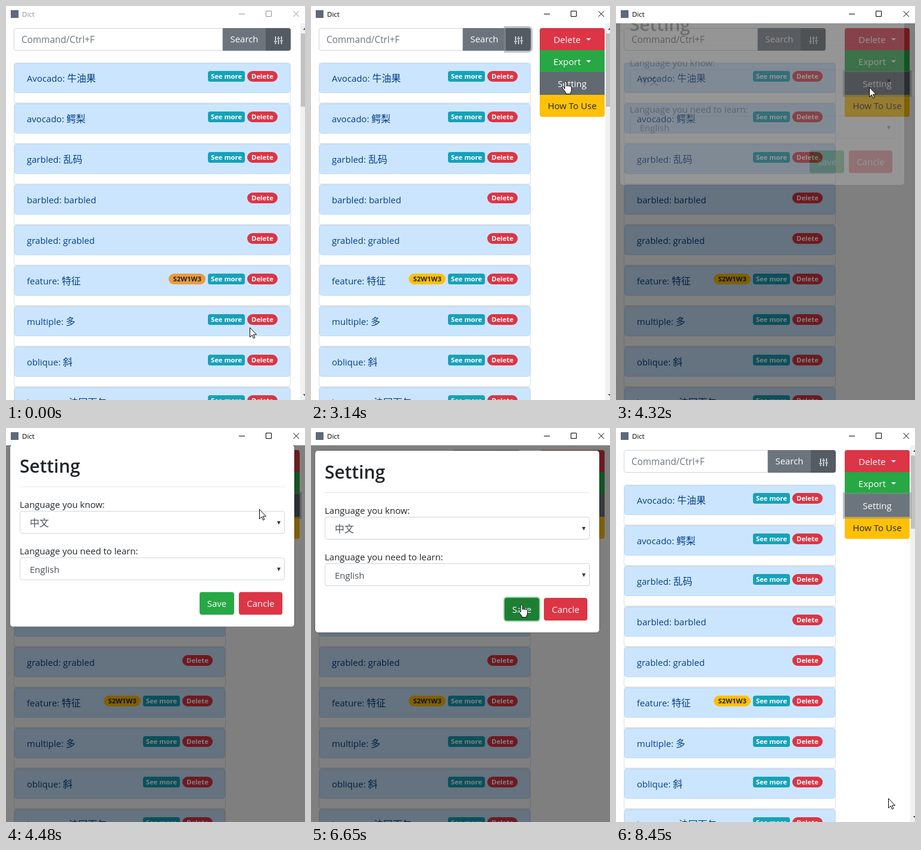
Animation of 502x661 px, one loop 8600 ms. Source, as an HTML page:

```html
<!DOCTYPE html>
<html lang="en">
<head>
<meta charset="utf-8">
<title>Dict</title>
<style>
  * { box-sizing: border-box; }
  html, body { margin: 0; width: 100%; height: 100%; overflow: hidden; background: #fff; }
  body { font: 15px "Open Sans", "Noto Sans", sans-serif; color: #212529; }
  #stage { position: relative; width: 502px; height: 661px; overflow: hidden; background: #fff; }
  #stage > *, .modal > * { position: absolute; }
  svg { display: block; overflow: visible; }

  /* title bar */
  .bar { left: 0; top: 0; width: 502px; height: 29px; background: #fff; z-index: 5; animation: wake 8.6s step-end infinite; }
  .bar > * { position: absolute; }
  .bar i { left: 8px; top: 7px; width: 13px; height: 13px; background: #5b6a7c; }
  .bar span { left: 27px; font-size: 11.5px; line-height: 28px; }
  .bar svg { left: 0; top: 0; fill: none; stroke: currentColor; }
  @keyframes wake { 0% { color: #96908f; } 26.628%, 100% { color: #000; } }

  /* search row */
  .search { left: 13px; top: 37px; height: 38px; display: flex; line-height: 37px; color: #fff; animation: search 8.6s step-end infinite; }
  .field { flex: 1; padding-left: 12px; border: 1px solid #ced4da; border-radius: 4px 0 0 4px; font-size: 15.4px; color: #6c757d; }
  .go { width: 72px; background: #6c757d; text-align: center; }
  .tune { width: 42px; padding: 14px 0 0 14px; background: #545b62; border-radius: 0 4px 4px 0; animation: tune 8.6s infinite; }
  @keyframes search {
    0% { width: 465px; } 28.488% { width: 356px; }
    47.791% { width: 339px; } 82.209%, 100% { width: 356px; }
  }
  @keyframes tune {
    0%, 26.628%, 47.442%, 100% { box-shadow: 0 0 0 0 rgba(130,138,145,.5); }
    28.372%, 45.698% { box-shadow: 0 0 0 3.2px rgba(130,138,145,.5); }
  }

  /* word list */
  .list { left: 13px; top: 95px; animation: list 8.6s step-end infinite; }
  @keyframes list { 0% { width: 465px; } 28.488%, 100% { width: 356px; } }
  .card { position: relative; height: 68px; border: 1px solid rgba(0,0,0,.125); border-radius: 4px; background: #fff; }
  .word { height: 50px; padding-left: 20px; border: 1px solid #b8daff; border-radius: 4px; background: #cce5ff; color: #004085; line-height: 48px; white-space: nowrap; }
  .zh { font: 16px/0 "Noto Sans CJK SC", "Noto Sans CJK", sans-serif; }
  .tags { position: absolute; right: 21px; top: 13px; display: flex; gap: 4px; font: 700 11.3px/18px "Open Sans", sans-serif; color: #fff; }
  .tags b { height: 18px; padding: 0 7.2px; border-radius: 9px; }
  .tags .more { padding: 0 4.8px; border-radius: 4px; background: #17a2b8; }
  .del { background: #dc3545; }
  .code { color: #212529; animation: code 8.6s step-end infinite; }
  @keyframes code { 0% { background: #ee9a3c; } 26.628%, 100% { background: #ffc107; } }

  /* side menu */
  .menu { left: 384px; top: 37px; width: 109px; color: #fff; text-align: center; animation: menu 8.6s step-end infinite; }
  .menu div { position: relative; height: 38px; margin-bottom: -1px; line-height: 38px; }
  .menu div:first-child { background: #dc3545; border-radius: 4px 4px 0 0; animation: red 8.6s infinite; }
  .menu div:nth-child(2) { background: #28a745; animation: green 8.6s infinite; }
  .menu div:nth-child(3) { z-index: 1; animation: setting 8.6s infinite; }
  .menu div:last-child { background: #ffc107; color: #212529; border-radius: 0 0 4px 4px; }
  .caret::after { content: ""; display: inline-block; margin-left: 9px; vertical-align: 4px; border: 4.8px solid transparent; border-top-color: #fff; border-bottom: 0; }
  @keyframes menu { 0% { visibility: hidden; } 28.488%, 100% { visibility: visible; } }
  @keyframes red { 0%, 28.488%, 36.5%, 100% { background: #dc3545; } 30.233%, 35% { background: #c82333; } }
  @keyframes green { 0%, 35.3%, 36.5%, 100% { background: #28a745; } 35.9% { background: #218838; } }
  @keyframes setting {
    0%, 35.93% { background: #6c757d; box-shadow: 0 0 0 0 rgba(130,138,145,.5); }
    36.512% { background: #626a71; }
    37.7%, 45.698% { background: #5a6268; box-shadow: 0 0 0 0 rgba(130,138,145,.5); }
    47.442%, 77.32% { background: #545b62; box-shadow: 0 0 0 3.2px rgba(130,138,145,.5); }
    77.326%, 82.209% { background: #6c757d; box-shadow: 0 0 0 0 rgba(130,138,145,.5); }
    83.605%, 100% { background: #6c757d; box-shadow: 0 0 0 3.2px rgba(130,138,145,.5); }
  }

  .scroll { left: 494px; top: 29px; width: 17px; height: 632px; background: #f1f1f1; animation: scroll 8.6s step-end infinite; }
  .scroll::before { content: ""; position: absolute; left: 1px; top: 17px; width: 15px; height: 123px; background: #c1c1c1; }
  @keyframes scroll { 0% { visibility: visible; } 47.791% { visibility: hidden; } 82.209%, 100% { visibility: visible; } }

  /* dialog */
  .shade { inset: 29px 0 0; background: #000; z-index: 2; animation: shade 8.6s linear infinite; }
  @keyframes shade { 0%, 47.791%, 82.151%, 100% { opacity: 0; } 49.535%, 80.407% { opacity: .5; } }
  .modal { left: 7px; top: 38px; width: 477px; height: 305px; background: #fff; border-radius: 4.8px; box-shadow: 0 0 0 1px rgba(0,0,0,.2); z-index: 3; animation: fade 8.6s linear infinite, slide 8.6s ease-out infinite; }
  .modal h2 { left: 16px; top: 16px; margin: 0; font-size: 30px; font-weight: 600; line-height: 40px; }
  .modal hr { left: 16px; top: 70px; width: 445px; margin: 0; border: 0; border-top: 1px solid rgba(0,0,0,.1); }
  .modal label { left: 16px; line-height: 24px; }
  .pick { left: 16px; width: 445px; height: 38px; padding-left: 16px; border: 1px solid #ced4da; border-radius: 4px; line-height: 38px; color: #495057; }
  .pick::after { content: ""; position: absolute; right: 6px; top: 16px; border: 3px solid transparent; border-top: 6px solid #343a40; border-bottom: 0; }
  .btn { top: 247px; height: 38px; border-radius: 4px; line-height: 38px; color: #fff; text-align: center; }
  .save { left: 318px; width: 58px; animation: save 8.6s infinite; }
  .cancel { left: 384px; width: 73px; background: #dc3545; }
  @keyframes fade { 0%, 49.93%, 80.349%, 100% { opacity: 0; } 51.674%, 78.605% { opacity: 1; } }
  @keyframes slide {
    0%, 49.93% { transform: translateY(-50px); } 53.419%, 78.605% { transform: none; }
    80.349% { transform: translateY(-40px); } 100% { transform: translateY(-50px); }
  }
  @keyframes save {
    0%, 63.6% { background: #28a745; }
    65%, 77.32% { background: #218838; box-shadow: 0 0 0 0 rgba(40,167,69,.5); }
    77.326% { background: #1e7e34; box-shadow: 0 0 0 2px rgba(40,167,69,.5); }
    78.2%, 100% { background: #1e7e34; box-shadow: 0 0 0 3.2px rgba(40,167,69,.5); }
  }

  /* pointer */
  .pointer { left: 0; top: 0; z-index: 6; animation: move 8.6s linear infinite; }
  .pointer svg { position: absolute; left: 0; top: 0; fill: #fff; stroke: #000; }
  .arrow { animation: arrow 8.6s step-end infinite; }
  .pointer .hand { left: -5px; animation: hand 8.6s step-end infinite; }
  @keyframes arrow {
    0% { visibility: visible; } 22.44% { visibility: hidden; } 47.791% { visibility: visible; }
    63.7% { visibility: hidden; } 80.349%, 100% { visibility: visible; }
  }
  @keyframes hand {
    0% { visibility: hidden; } 22.44% { visibility: visible; } 47.791% { visibility: hidden; }
    63.7% { visibility: visible; } 80.349%, 100% { visibility: hidden; }
  }
  @keyframes move {
    0% { transform: translate(409px, 539px); }
    8.605% { transform: translate(409px, 539px); animation-timing-function: ease-in-out; }
    16.744%, 17.6% { transform: translate(455px, 134px); animation-timing-function: ease-in-out; }
    23.953%, 34.3% { transform: translate(458px, 54px); }
    36.512%, 37.44% { transform: translate(426px, 126px); }
    38.95% { transform: translate(427px, 148px); animation-timing-function: ease-out; }
    43.02%, 53.256% { transform: translate(425px, 136px); }
    55.698%, 56.5% { transform: translate(377px, 265px); }
    56.512%, 60.2% { transform: translate(377px, 268px); }
    65%, 84.884% { transform: translate(352px, 296px); }
    87.326%, 93.953% { transform: translate(430px, 547px); }
    96.395%, 98.25% { transform: translate(457px, 622px); }
    98.256%, 100% { transform: translate(457px, 621px); }
  }
</style>
</head>
<body>
<div id="stage">
  <div class="bar">
    <i></i><span>Dict</span>
    <svg width="502" height="29"><path d="M391 13.5h10M436.5 8.5h9v9h-9zM482.5 8.5l9.5 9.5M492 8.5l-9.5 9.5"/></svg>
  </div>

  <div class="search">
    <div class="field">Command/Ctrl+F</div>
    <div class="go">Search</div>
    <div class="tune">
      <svg width="15" height="13" fill="none" stroke="#fff" stroke-width="1.4"><path d="M2.5 0v7M2.5 10v3M7.5 0v2M7.5 5v8M12.5 0v6M12.5 9v4M.2 8.5h4.6M5.2 3.5h4.6M10.2 7.5h4.6"/></svg>
    </div>
  </div>

  <div class="list"></div>

  <div class="menu">
    <div class="caret">Delete</div>
    <div class="caret">Export</div>
    <div>Setting</div>
    <div>How To Use</div>
  </div>

  <div class="scroll">
    <svg width="17" height="632" fill="#505050"><path d="M4.500 11l4-4 4 4zM4.500 622l4 4 4-4z"/></svg>
  </div>

  <div class="shade"></div>
  <div class="modal">
    <h2>Setting</h2>
    <hr>
    <label style="top:88px">Language you know:</label>
    <div class="pick" style="top:111px"><span class="zh">中文</span></div>
    <label style="top:166px">Language you need to learn:</label>
    <div class="pick" style="top:189px">English</div>
    <div class="btn save">Save</div>
    <div class="btn cancel">Cancle</div>
  </div>

  <div class="pointer">
    <svg class="arrow" width="12" height="19"><path d="M.5.5v16l3.700-3.500 2.400 5.500 2.300-1-2.400-5.300h5z"/></svg>
    <svg class="hand" width="17" height="22"><path d="M5 13V2c0-2 3-2 3 0v6.500c.2-1.700 2.900-1.500 2.900.2.300-1.500 2.800-1.300 2.800.5.400-1.300 2.600-1 2.600.8V15c0 2-1 3-1.500 4.500v2H7v-1.800C5 17 3 14 1 11.500c-.8-1.800 1.200-2.600 2.500-1.200z"/></svg>
  </div>
</div>

<script>
  const words = [
    ["Avocado", "牛油果"], ["avocado", "鳄梨"], ["garbled", "乱码"],
    ["barbled"], ["grabled"], ["feature", "特征", "S2W1W3"],
    ["multiple", "多"], ["oblique", "斜"], ["baguette", "法国面包"]
  ];

  const card = ([word, zh, code]) => `
    <div class="card">
      <div class="word">${word}: ${zh ? `<span class="zh">${zh}</span>` : word}</div>
      <div class="tags">
        ${code ? `<b class="code">${code}</b>` : ""}
        ${zh ? `<b class="more">See more</b>` : ""}
        <b class="del">Delete</b>
      </div>
    </div>`;

  document.querySelector(".list").innerHTML = words.map(card).join("");
</script>
</body>
</html>
```
